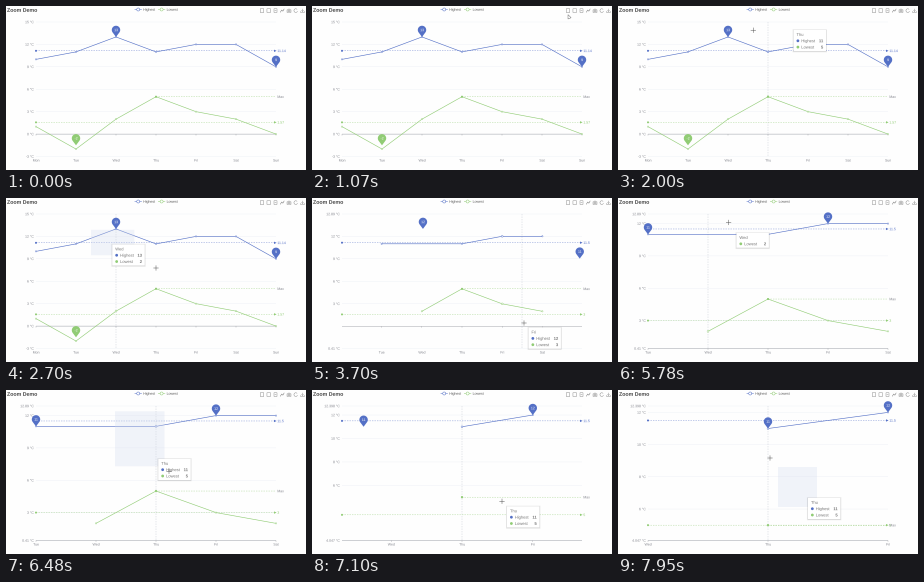
Recreate the animation shown at these times as a matplotlib script. Size 300 px wide and 164 px high, loop 8000 ms.

```python
import math
import numpy as np
import matplotlib.pyplot as plt
from matplotlib.animation import FuncAnimation
from matplotlib.patches import PathPatch
from matplotlib.path import Path
from matplotlib.textpath import TextPath
from matplotlib.transforms import Affine2D

W, H, STEP, LOOP = 300, 164, 50, 8000
LEFT, RIGHT, TOP, BOTTOM = 30, 270, 16, 150.5
BLUE, GREEN, GREY, SPLIT = "#5470c6", "#91cc75", "#83858d", "#e6eaf3"
DAYS = ["Mon", "Tue", "Wed", "Thu", "Fri", "Sat", "Sun"]
SERIES = [("Highest", BLUE, [10, 11, 13, 11, 12, 12, 9]),
          ("Lowest", GREEN, [1, -2, 2, 5, 3, 2, 0])]
ZOOM_MS = 450
DRAGS = [(2550, 3600), (5850, 6900), (7800, LOOP + 1)]

# where the pointer passes: time, x, y
STOPS = [(300, 190, 172), (1000, 256, 9), (1400, 256, 6), (2250, 85, 31.8),
         (2550, 85, 31.8), (2700, 150, 70), (3400, 212, 125), (3950, 212, 125),
         (4150, 150, 66), (4300, 141, 32), (4800, 258, 6), (5350, 117, 37),
         (5850, 109, 21.3), (6750, 190, 111.3), (7150, 190, 111.3),
         (7800, 199, 117), (7900, 160, 77), (7950, 152, 68)]


def cursor(t):
    times, xs, ys = zip(*STOPS)
    return np.interp(t, times, xs), np.interp(t, times, ys)


def in_grid(x, y):
    return LEFT <= x <= RIGHT and TOP <= y <= BOTTOM


class View:
    """The days and values that the grid shows from a given time on."""

    def __init__(self, start, first, last, low, high):
        self.start, self.first, self.last = start, first, last
        self.low, self.high = low, high
        rough = (high - low) / 5
        step = min((1, 2, 3, 5), key=lambda s: abs(math.log(s / rough)))
        inner = range(math.ceil(low / step) * step, math.ceil(high), step)
        self.ticks = [v for v in inner if low < v < high]

    def x(self, day):
        return LEFT + (RIGHT - LEFT) * (day - self.first) / (self.last - self.first)

    def y(self, value):
        return TOP + (BOTTOM - TOP) * (self.high - value) / (self.high - self.low)

    def day_at(self, x):
        return round(self.first + (x - LEFT) / (RIGHT - LEFT) * (self.last - self.first))

    def value_at(self, y):
        return self.high - (y - TOP) / (BOTTOM - TOP) * (self.high - self.low)

    def axis(self):
        return min(self.y(0), BOTTOM)

    def kept(self, values):
        return [(d, v) for d, v in enumerate(values)
                if self.first <= d <= self.last and self.low <= v <= self.high]

    def zoomed(self, drag, digits):
        (x0, y0), (x1, y1) = map(cursor, drag)
        return View(drag[1] + 40, self.day_at(x0), self.day_at(x1),
                    round(self.value_at(y1), digits), round(self.value_at(y0), digits))


VIEWS = [View(0, 0, 6, -3, 15)]
for drag, digits in zip(DRAGS[:2], (2, 3)):
    VIEWS.append(VIEWS[-1].zoomed(drag, digits))

fig = plt.figure(figsize=(W / 100, H / 100), dpi=100, facecolor="#fefefe")
ax = fig.add_axes([0, 0, 1, 1])
ax.set(xlim=(0, W), ylim=(H, 0))
ax.axis("off")
drawn = []
glyphs = {}


def add(path, fill="none", edge="none", lw=0.0, dashed=False, alpha=1, clip=False):
    points = lw * 0.72
    style = (0, (1 / points, 0.8 / points)) if dashed else "-"
    patch = PathPatch(path, facecolor=fill, edgecolor=edge, linewidth=points,
                      linestyle=style, alpha=alpha, capstyle="butt", snap=False)
    ax.add_artist(patch)
    if clip:
        box = Path.unit_rectangle().transformed(
            Affine2D().scale(RIGHT - LEFT + 2, BOTTOM - TOP + 2).translate(LEFT - 1, TOP - 1))
        patch.set_clip_path(box, ax.transData)
    drawn.append(patch)


def line(points, color, lw=0.4, **kw):
    add(Path(points), edge=color, lw=lw, **kw)


def poly(points, fill="none", **kw):
    add(Path(list(points) + [points[0]], closed=True), fill, **kw)


def circle(x, y, r, fill, **kw):
    add(Path.circle((x, y), r), fill, **kw)


def rect(x, y, w, h, fill="none", **kw):
    poly([(x, y), (x + w, y), (x + w, y + h), (x, y + h)], fill, **kw)


def arc(x, y, r, start, end):
    return [(x + r * math.cos(a), y + r * math.sin(a))
            for a in np.radians(np.linspace(start, end, 30))]


def text(x, y, s, size=3.5, color=GREY, align=0.0, weight="normal"):
    key = (s, size, weight)
    if key not in glyphs:
        path = TextPath((0, 0), s, size=size,
                        prop={"family": "Liberation Sans", "weight": weight})
        glyphs[key] = path, path.get_extents().x1
    path, width = glyphs[key]
    place = Affine2D().scale(1, -1).translate(x - align * width, y + 0.35 * size)
    add(place.transform_path(path), color)


def pin(x, y, value, color):
    poly(arc(x, y - 7, 4.2, 145, 395) + [(x, y)], color)
    text(x, y - 7, str(value), 3.5, "white", 0.5)


def toolbox():
    color, y, r = "#777777", 4.6, 1.8
    zoom, back, sheet, trend, bars, restore, save = (256 + 6.75 * k for k in range(7))
    for x, half in ((zoom, r), (back, r), (sheet, 1.5)):
        rect(x - half, y - r, 2 * half, 2 * r, edge=color, lw=0.4)
    line([(sheet - 0.8, y), (sheet + 0.8, y)], color)
    line([(trend - 2, y + r), (trend - 0.6, y - 0.6), (trend + 0.6, y + 0.6),
          (trend + 2, y - r)], color, 0.5)
    for k in (-1, 0, 1):
        height = 3.4 - 0.8 * abs(k)
        rect(bars + 1.5 * k - 0.5, y + r - height, 1, height, edge=color, lw=0.35)
    line(arc(restore, y, r, 20, 320), color)
    line([(save - 2, y + 0.6), (save - 2, y + r), (save + 2, y + r), (save + 2, y + 0.6)], color)
    line([(save, y - r), (save, y + 0.8)], color)
    line([(save - 1, y - 0.2), (save, y + 0.8), (save + 1, y - 0.2)], color)


def header():
    text(1, 4, "Zoom Demo", 5.25, "#464646", weight="bold")
    for x, (name, color, _) in zip((128.6, 152), SERIES):
        line([(x, 3.5), (x + 7.2, 3.5)], color, 0.5)
        circle(x + 3.6, 3.5, 1.5, "white", edge=color, lw=0.5)
        text(x + 8.6, 3.5, name, 3.5, "#555555")
    toolbox()


def grid(view, px, py, axis_y):
    heights = {v: py(v) for v in view.ticks}
    heights.update({view.low: BOTTOM, view.high: TOP})
    for v, y in heights.items():
        line([(LEFT, y), (RIGHT, y)], SPLIT, 0.3)
        text(27.7, y, f"{v} °C", align=1)
    line([(LEFT, axis_y), (RIGHT, axis_y)], GREY, 0.35)
    for d in range(view.first, view.last + 1):
        line([(px(d), axis_y), (px(d), axis_y + 1.4)], GREY, 0.3)
        text(px(d), 154.3, DAYS[d], align=0.5)


def mark_line(x, y, color, label, label_color, arrow=True):
    line([(x, y), (RIGHT, y)], color, 0.35, dashed=True)
    circle(x, y, 1, color)
    if arrow:
        poly([(RIGHT + 0.6, y), (RIGHT - 2, y - 1.2), (RIGHT - 2, y + 1.2)], color)
    text(271.3, y, label, 3.5, label_color)


def tooltip(x, y, day, view):
    rows = [(name, color, values[day]) for name, color, values in SERIES
            if (day, values[day]) in view.kept(values)]
    if not rows:
        return
    w, h = 32.5, 8.4 + 6.4 * len(rows)
    for grow in (1, 0.5, 0.2):
        rect(x - grow, y - grow + 0.3, w + 2 * grow, h + 2 * grow, "black", alpha=0.06)
    rect(x, y, w, h, "white")
    text(x + 3, y + 4.6, DAYS[day], 4.06, "#777777")
    for k, (name, color, value) in enumerate(rows):
        row_y = y + 10.9 + 6.3 * k
        circle(x + 4.4, row_y, 1.4, color)
        text(x + 7.8, row_y, name, 4.06, "#777777")
        text(x + 29.6, row_y, str(value), 4.06, "#777777", 1, "bold")


def pointer(x, y, cross):
    if cross:
        line([(x - 2.6, y), (x + 2.6, y)], "#444444", 0.45)
        line([(x, y - 2.6), (x, y + 2.6)], "#444444", 0.45)
    else:
        poly([(x, y), (x, y + 4.4), (x + 3.1, y + 3.1)], "white", edge="#555555", lw=0.4)


def draw(frame):
    while drawn:
        drawn.pop().remove()
    t = frame * STEP
    index = max(k for k, v in enumerate(VIEWS) if t >= v.start)
    view, old = VIEWS[index], VIEWS[max(index - 1, 0)]
    u = min((t - view.start) / ZOOM_MS, 1)
    ease = 4 * u ** 3 if u < 0.5 else 1 - 4 * (1 - u) ** 3

    def mix(a, b):
        return a + (b - a) * ease

    def px(day):
        return mix(old.x(day), view.x(day))

    def py(value):
        return mix(old.y(value), view.y(value))

    header()
    grid(view, px, py, mix(old.axis(), view.axis()))

    # the chart reacts one step after the pointer
    here, seen = cursor(t), cursor(t - STEP)
    hover = in_grid(*here) and in_grid(*seen)
    day = view.day_at(seen[0])
    if hover:
        x = view.x(day)
        line([(x, TOP), (x, BOTTOM)], "#b9bec9", 0.35, dashed=True)

    for _, color, values in SERIES:
        spots = [(d, px(d), py(v)) for d, v in view.kept(values)]
        if len(spots) > 1:
            line([(x, y) for _, x, y in spots], color, 0.6, clip=True)
        for d, x, y in spots:
            circle(x, y, 0.9 if hover and d == day else 0.65, "white",
                   edge=color, lw=0.4, clip=True)

    for _, color, values in SERIES:
        before, after = old.kept(values), view.kept(values)
        mean_0, mean = (np.mean([v for _, v in pts]) for pts in (before, after))
        mark_line(LEFT, mix(old.y(mean_0), view.y(mean)), color, f"{round(mean, 2):g}", color)
        if color == GREEN:
            d, v = max(after, key=lambda p: p[1])
            mark_line(px(d), py(v), color, "Max", GREY, arrow=False)
            if view.low < -1.5:
                pin(px(1), py(-1.5), -2, color)
        else:
            for pick in (max, min):
                (d0, v0), (d1, v1) = (pick(pts, key=lambda p: p[1]) for pts in (before, after))
                pin(mix(old.x(d0), view.x(d1)), mix(old.y(v0), view.y(v1)), v1, color)

    for start, end in DRAGS:
        if start < t < end:
            x0, y0 = cursor(start)
            rect(x0, y0, seen[0] - x0, seen[1] - y0, "#d2dbee", alpha=0.3)

    if hover:
        # the box glides after the pointer for 400 ms
        x, y = np.mean([cursor(t - k * STEP) for k in range(8)], axis=0)
        tooltip(min(x + 5, W - 34), min(y + 5, H - 23), day, view)
    if t > 300:
        pointer(*here, in_grid(*here))
    return drawn


anim = FuncAnimation(fig, draw, frames=LOOP // STEP, interval=STEP,
                     repeat=True, repeat_delay=0, blit=False)
plt.show()
```
